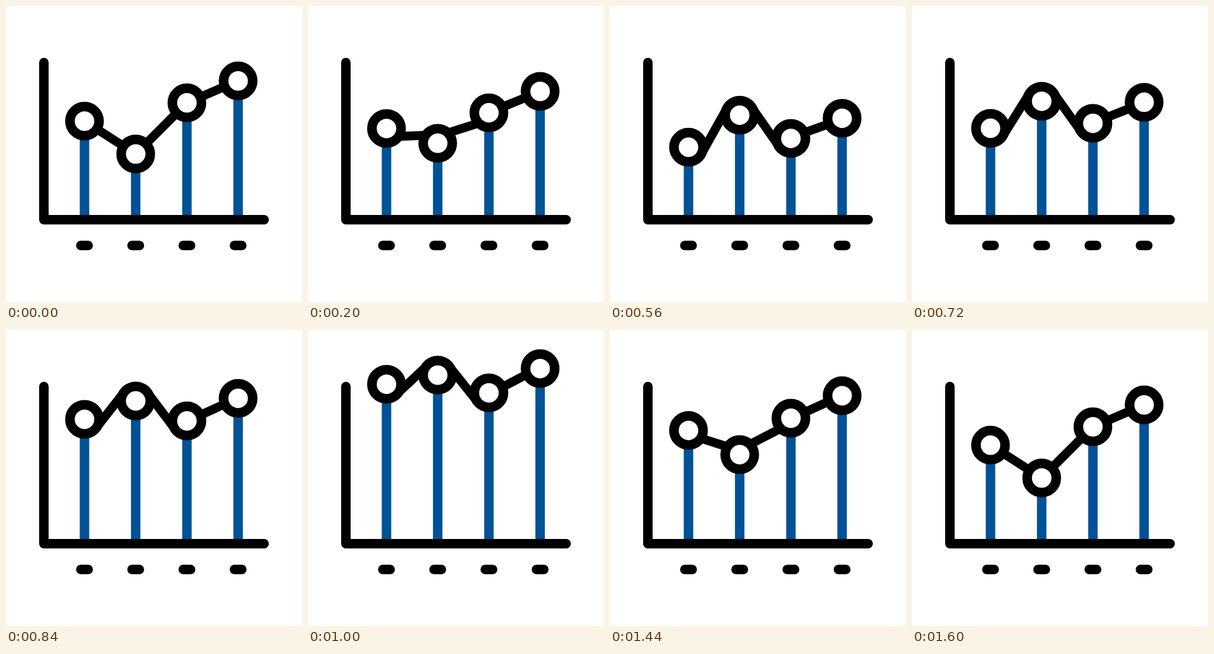
Write an HTML page with a canvas that moves like this. It is 500 px wide and 500 px high and loops after 1960 ms.

```html
<!DOCTYPE html>
<html lang="en">
<head>
<meta charset="utf-8">
<title>Line chart</title>
<style>
  html, body { margin: 0; width: 100%; height: 100%; overflow: hidden; background: #fff; }
  canvas { display: block; width: 500px; height: 500px; }
</style>
</head>
<body>
<canvas id="stage" width="500" height="500"></canvas>
<script>
const ctx = document.getElementById('stage').getContext('2d');
const LOOP = 1960;
const FRAME = 40;
const RING = 24.6;
const BLUE = '#005296';
const BLACK = '#000';

const xs = [132.6, 219.1, 305.6, 392.1];
const rest = [194.5, 250, 163.5, 126.5];
const poses = [
  { time: 0, ys: rest },
  { time: 536, ys: [239.1, 184.8, 224.1, 190.1] },
  { time: 1113, ys: [79.4, 67.2, 96.4, 54.8] },
  { time: 1600, ys: rest }
];

// Connectors keep the ring anchors they have in the resting pose.
const anchors = xs.slice(1).map((x, i) => {
  const dx = x - xs[i];
  const dy = rest[i + 1] - rest[i];
  const length = Math.hypot(dx, dy);
  return { x: dx / length * RING, y: dy / length * RING };
});

const ease = u => u < 0.5 ? 2 * u * u : 1 - 2 * (1 - u) ** 2;

function heightsAt(time) {
  const next = poses.findIndex(pose => pose.time > time);
  if (next < 0) return rest;
  const from = poses[next - 1];
  const to = poses[next];
  const e = ease((time - from.time) / (to.time - from.time));
  return from.ys.map((y, i) => y + (to.ys[i] - y) * e);
}

function line(points, color, width, cap = 'round') {
  ctx.strokeStyle = color;
  ctx.lineWidth = width;
  ctx.lineCap = cap;
  ctx.lineJoin = 'round';
  ctx.beginPath();
  points.forEach(([x, y]) => ctx.lineTo(x, y));
  ctx.stroke();
}

function ring(x, y) {
  ctx.beginPath();
  ctx.arc(x, y, RING, 0, Math.PI * 2);
  ctx.fillStyle = '#fff';
  ctx.fill();
  ctx.strokeStyle = BLACK;
  ctx.lineWidth = 16.2;
  ctx.stroke();
}

function draw(time) {
  const ys = heightsAt(time);
  ctx.fillStyle = '#fff';
  ctx.fillRect(0, 0, 500, 500);

  xs.forEach((x, i) => line([[x, ys[i]], [x, 358]], BLUE, 16, 'butt'));
  line([[64, 95.5], [64, 361], [436, 361]], BLACK, 16);
  xs.forEach((x, i) => {
    line([[x - 6.2, 404.5], [x + 6.2, 404.5]], BLACK, 16);
    ring(x, ys[i]);
  });
  anchors.forEach((a, i) => line([
    [xs[i] + a.x, ys[i] + a.y],
    [xs[i + 1] - a.x, ys[i + 1] - a.y]
  ], BLACK, 15));
}

const start = performance.now();
function tick() {
  const time = (performance.now() - start) % LOOP;
  draw(Math.floor(time / FRAME) * FRAME);
  requestAnimationFrame(tick);
}
tick();
</script>
</body>
</html>
```
